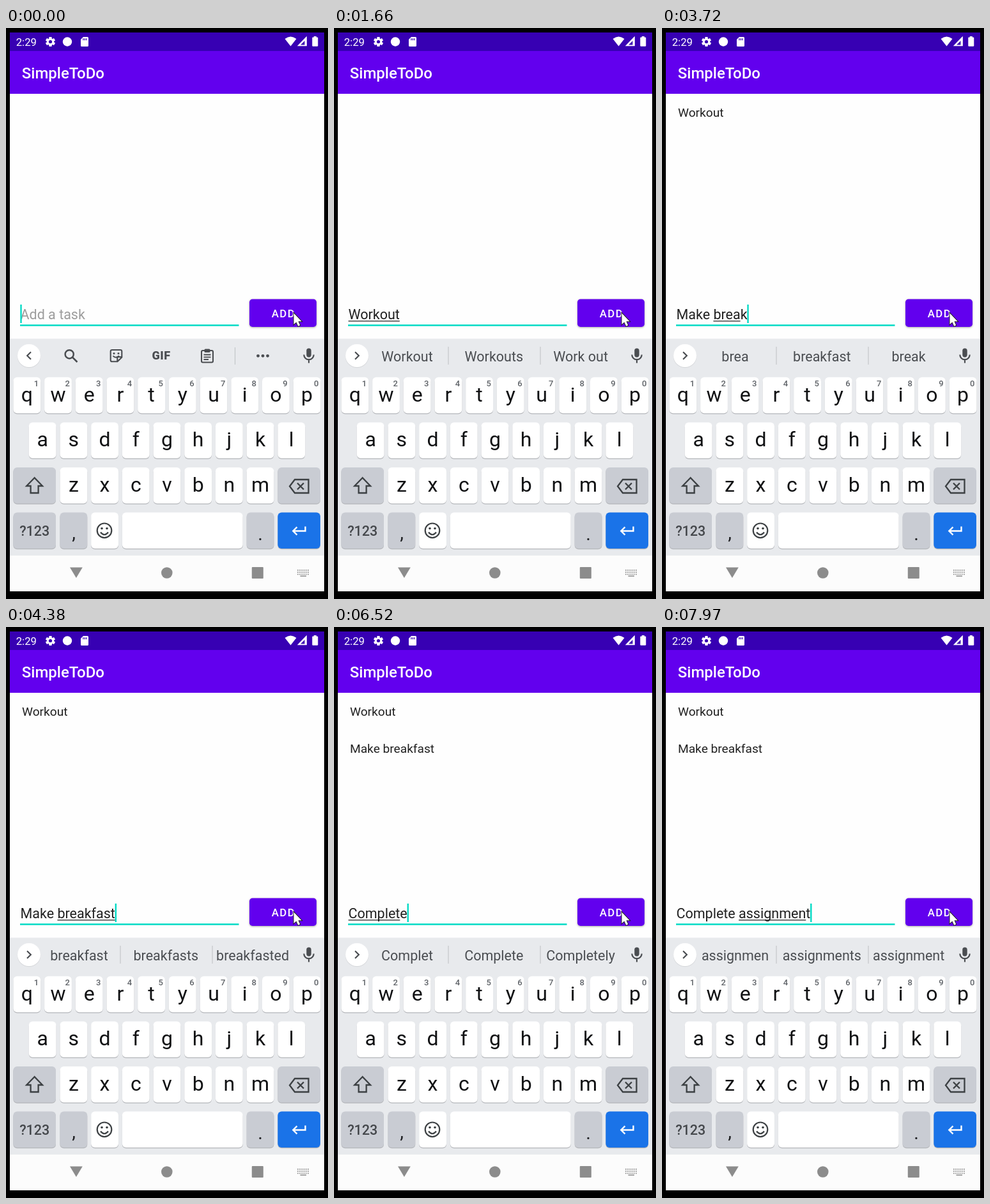
An HTML page with a canvas that plays this animation: 504 by 894 pixels, repeating every 8 s.

```html
<!DOCTYPE html>
<html lang="en">
<head>
<meta charset="utf-8">
<title>To-do list</title>
<style>
html, body { margin: 0; width: 100%; height: 100%; overflow: hidden; background: #000; }
canvas { display: block; }
</style>
</head>
<body>
<canvas id="stage" width="504" height="894"></canvas>
<script>
const ctx = document.getElementById('stage').getContext('2d');
const LOOP = 8000;
const PURPLE = '#6200ee', TEAL = '#03dac5', BAR = '#3700b3';
const BOARD = '#e8eaed', ICON = '#4a4d51', GREY = '#8c8c8c', INK = '#212121';

// time, typed text, length of underlined tail, suggestions
const typing = [
  [0, ''],
  [410, 'W'],
  [580, 'Wo', 1, 'W|We|What'],
  [740, 'Work', 2, 'Wo|Work|Would'],
  [900, 'Worko', 4, 'Work|Working|Works'],
  [1070, 'Workout', 6, 'Workou|Workout|Workouts'],
  [1230, 'Workout', 7, 'Workout|Workouts|Work out'],
  [1910, ''],
  [2580, 'M'],
  [2730, 'Ma', 1, 'M|My|Me'],
  [2850, 'Mak', 2, 'Ma|May|Maybe'],
  [2980, 'Make', 3, 'Mak|Make|Making'],
  [3100, 'Make ', 0, 'Make|Makes|Maker'],
  [3230, 'Make b', 0, 'sure|it|a'],
  [3360, 'Make br', 1, 'b|be|by'],
  [3480, 'Make bre', 2, 'br|bring|break'],
  [3600, 'Make brea', 3, 'bre|bread|break'],
  [3720, 'Make break', 4, 'brea|breakfast|break'],
  [3840, 'Make breakf', 5, 'break|breakfast|breaks'],
  [3970, 'Make breakfa', 6, 'breakf|breakfast|breakfasts'],
  [4100, 'Make breakfas', 7, 'breakfa|breakfast|breakfasts'],
  [4240, 'Make breakfast', 8, 'breakfas|breakfast|breakfasts'],
  [4380, 'Make breakfast', 9, 'breakfast|breakfasts|breakfasted'],
  [5060, ''],
  [5710, 'C'],
  [5840, 'Co', 1, 'C|Can|Call'],
  [5970, 'Com', 2, 'Co|Could|Come'],
  [6110, 'Comp', 3, 'Com|Come|Coming'],
  [6250, 'Compl', 4, 'Comp|Company|Complete'],
  [6390, 'Complet', 5, 'Compl|Complete|Completely'],
  [6520, 'Complete', 7, 'Complet|Complete|Completely'],
  [6640, 'Complete', 8, 'Complete|Completed|Completely'],
  [6760, 'Complete ', 0, 'Complete|Completed|Completely'],
  [6890, 'Complete a', 0, 'the|and|this'],
  [7040, 'Complete as', 1, 'a|and|all'],
  [7200, 'Complete assi', 2, 'as|ask|assignment'],
  [7370, 'Complete assig', 4, 'assi|assignment|assist'],
  [7540, 'Complete assign', 5, 'assig|assignment|assign'],
  [7700, 'Complete assignme', 7, 'assignm|assignments|assignment'],
  [7820, 'Complete assignmen', 8, 'assignme|assignments|assignment'],
  [7970, 'Complete assignment', 9, 'assignmen|assignments|assignment']
];
const cursorOff = [[1660, 1910], [2330, 2580], [4910, 5060], [5430, 5710]];
const pressed = [[1780, 2050], [5060, 5180]];
const items = [[1910, 'Workout', 139], [5060, 'Make breakfast', 196.5]];
const within = (t, spans) => spans.some(([a, b]) => t >= a && t < b);

function rect(x, y, w, h, color, r = 0) {
  ctx.fillStyle = color;
  ctx.beginPath();
  ctx.roundRect(x, y, w, h, r);
  ctx.fill();
}
function disc(x, y, r, color) {
  ctx.fillStyle = color;
  ctx.beginPath();
  ctx.arc(x, y, r, 0, 7);
  ctx.fill();
}
function text(s, x, y, size, color, weight = 400, align = 'left', spacing = 0) {
  ctx.font = `${weight} ${size}px Roboto, sans-serif`;
  ctx.letterSpacing = spacing + 'px';
  ctx.textAlign = align;
  ctx.fillStyle = color;
  ctx.fillText(s, x, y);
}
function shape(d, color, width) {
  const p = new Path2D(d);
  if (width) {
    ctx.strokeStyle = color;
    ctx.lineWidth = width;
    ctx.stroke(p);
  } else {
    ctx.fillStyle = color;
    ctx.fill(p);
  }
}

function statusBar() {
  rect(6, 7, 492, 29, BAR);
  text('2:29', 15.7, 27.7, 16.75, '#fff');
  ctx.save();
  ctx.translate(69.5, 21.5);
  for (let i = 0; i < 6; i++) {
    rect(-2.2, -7.6, 4.4, 4, '#fff', 0.8);
    ctx.rotate(Math.PI / 3);
  }
  ctx.restore();
  disc(69.5, 21.5, 5.6, '#fff');
  disc(69.5, 21.5, 2.6, BAR);
  disc(96, 21.5, 7.2, '#fff');
  shape('M121 14H127.5Q129 14 129 15.5V27.5Q129 29 127.5 29H118.5Q117 29 117 27.5V18Z', '#fff');
  for (const x of [120.3, 122.8, 125.3]) rect(x, 16.3, 1.3, 3, BAR);
  shape('M436.5 17Q445.5 10 454.5 17L445.5 28.5Z', '#fff');
  shape('M470 14.5V27.5H457.5Z', '#fff', 1.4);
  shape('M465.5 19L470.5 14V28H465.5Z', '#fff');
  shape('M456.5 28L466 18.5V28Z', '#fff');
  shape('M461 26.6L467.5 20V26.6Z', '#3f12b5');
  rect(479.3, 14.5, 9, 14.3, '#fff', 1.2);
  rect(481.8, 13, 4, 2, '#fff');
}

function key(x, y, w, color = '#fff') {
  rect(x, y + 1.3, w, 56.4, '#b4b6ba', 6);
  rect(x, y, w, 56.4, color, 6);
}

function keyboard() {
  const left = 11.4, pitch = 48.7, w = 42.8, wide = 66.6, dark = '#c9ccd3';
  const tops = [546.8, 617.4, 688, 758.6];
  rect(6, 486.5, 492, 339.5, BOARD);
  ['qwertyuiop', 'asdfghjkl', 'zxcvbnm'].forEach((row, r) => {
    [...row].forEach((c, i) => {
      const x = left + pitch * (i + r * r * 0.25 + r * 0.25);
      key(x, tops[r], w);
      text(c, x + w / 2, tops[r] + 38, 32, '#101113', 400, 'center');
      if (!r) text((i + 1) % 10, x + 36, 561.3, 13, '#5f6368', 500, 'center');
    });
  });
  const end = left + pitch * 8.5;
  key(left, tops[2], wide, dark);
  key(end, tops[2], wide, dark);
  key(left, tops[3], wide, dark);
  key(left + pitch * 1.5, tops[3], w, dark);
  key(left + pitch * 2.5, tops[3], w);
  key(left + pitch * 3.5, tops[3], 188.8);
  key(left + pitch * 7.5, tops[3], w, dark);
  key(end, tops[3], wide, '#1a73e8');

  shape('M44.6 704.2L32.2 717H38.6V728H50.6V717H57Z', '#3c4043', 2.3);
  shape('M452 707H473.5V728H452L444 717.5Z', '#3c4043', 2.3);
  shape('M456 712.5L466 722.5M466 712.5L456 722.5', '#3c4043', 2.3);
  text('?123', 44.7, 794.5, 21.5, '#44474b', 500, 'center');
  text(',', 106, 800, 29, '#202124', 400, 'center');
  text('.', 398, 801.5, 29, '#202124', 400, 'center');
  shape('M165.3 786.8A11.3 11.3 0 1 1 142.7 786.8A11.3 11.3 0 1 1 165.3 786.8', '#3c4043', 2.2);
  disc(150, 783.5, 1.8, '#3c4043');
  disc(158, 783.5, 1.8, '#3c4043');
  shape('M148 789.5Q154 797 160 789.5', '#3c4043', 2.2);
  shape('M468.5 780.5V787.5H449.5M455.5 781.3L449.3 787.5L455.5 793.7', '#fff', 2.4);
}

function mic() {
  rect(470.3, 501.5, 7.4, 14, ICON, 3.7);
  shape('M466.3 511.5A7.7 7.7 0 0 0 481.7 511.5M474 519V524.5', ICON, 2.2);
}

function toolbar(words) {
  disc(36, 514, 18.2, '#d5d7da');
  disc(36, 513, 18, '#fff');
  mic();
  if (words) {
    shape('M33 507.3L38.8 513L33 518.7', ICON, 2.2);
    words.split('|').forEach((s, i) => {
      text(s, 114.5 + i * 135.8, 521.5, 21.5, '#4a4d51', 400, 'center');
    });
    rect(178.4, 499, 1.2, 28, '#c4c7ca');
    rect(322.4, 499, 1.2, 28, '#c4c7ca');
    return;
  }
  shape('M39 507.3L33.2 513L39 518.7', ICON, 2.2);
  shape('M105.8 510.8A6.6 6.6 0 1 1 92.6 510.8A6.6 6.6 0 1 1 105.8 510.8M104 515.5L111.5 523', ICON, 2.5);
  shape('M166 504H179Q181.3 504 181.3 506.3V515.5L174.5 522.3H166Q163.7 522.3 163.7 520V506.3Q163.7 504 166 504M181 515H174.3V522', ICON, 2.1);
  disc(169, 509.5, 1.5, ICON);
  disc(176, 509.5, 1.5, ICON);
  shape('M167.5 513.3Q172 518 177 513.3', ICON, 1.9);
  text('GIF', 243, 519.3, 18, ICON, 800, 'center', 0.5);
  shape('M308 505H322Q324 505 324 507V521.5Q324 523.5 322 523.5H308Q306 523.5 306 521.5V507Q306 505 308 505', ICON, 2.1);
  rect(310.5, 502.5, 9, 5.5, ICON, 1.5);
  shape('M309.5 511.5H320.5M309.5 515.3H320.5M309.5 519H317', ICON, 1.8);
  rect(357.9, 500, 1.2, 27, '#c4c7ca');
  for (const x of [394.5, 402, 409.5]) disc(x, 513.3, 2.4, ICON);
}

function navBar() {
  rect(6, 826, 492, 56, '#fcfcfc');
  shape('M100 844.5H119.8L109.9 861Z', GREY);
  disc(251.8, 853, 8.8, GREY);
  rect(384.8, 844, 18, 18, GREY, 1);
  for (let r = 0; r < 3; r++) {
    for (let i = 0; i < 6; i++) rect(456 + i * 3.2, 848 + r * 3.2, 1.8, 1.8, '#929292');
  }
  rect(460.5, 857.3, 9.5, 1.6, '#929292');
}

function button(down) {
  ctx.save();
  ctx.shadowColor = 'rgba(0,0,0,.35)';
  ctx.shadowBlur = down ? 7 : 3;
  ctx.shadowOffsetY = down ? 3 : 1;
  rect(381, 424.5, 105, 43.5, PURPLE, 4.8);
  ctx.restore();
  if (down) rect(381, 424.5, 105, 43.5, 'rgba(255,255,255,.22)', 4.8);
  text('ADD', 415.7, 452.8, 16.75, '#fff', 500, 'left', 1.5);
}

function field(s, tail, caret) {
  const x = 22.5;
  rect(22, 464.2, 342.5, 2.5, TEAL);
  text(s || 'Add a task', x, 456, 21.5, s ? INK : '#9c9c9c');
  const width = n => ctx.measureText(s.slice(0, n)).width;
  if (tail) {
    const start = s.lastIndexOf(' ') + 1;
    rect(x + width(start), 458.2, width(start + tail) - width(start), 1.3, INK);
  }
  if (caret) rect(x + width(s.length) - 0.2, 433, 2.4, 29, TEAL);
}

function draw(t) {
  const [, typed, tail, words] = typing.findLast(s => t >= s[0]);
  rect(0, 0, 504, 894, '#000');
  rect(6, 7, 492, 875, '#fefefe');
  statusBar();
  rect(6, 36, 492, 67, PURPLE);
  text('SimpleToDo', 24.8, 78.5, 24, '#fff', 500);
  for (const [at, label, y] of items) {
    if (t >= at) text(label, 25, y, 19.15, INK);
  }
  field(typed, tail, !within(t, cursorOff));
  button(within(t, pressed));
  keyboard();
  toolbar(words);
  navBar();
  const arrow = 'M450.5 446.5V464L454.4 460.4L457.2 466.8L460.2 465.5L457.5 459.3H462.6Z';
  shape(arrow, '#222', 2);
  shape(arrow, '#fff');
}

function tick(now) {
  draw(now % LOOP);
  requestAnimationFrame(tick);
}
draw(0);
requestAnimationFrame(tick);
</script>
</body>
</html>
```
